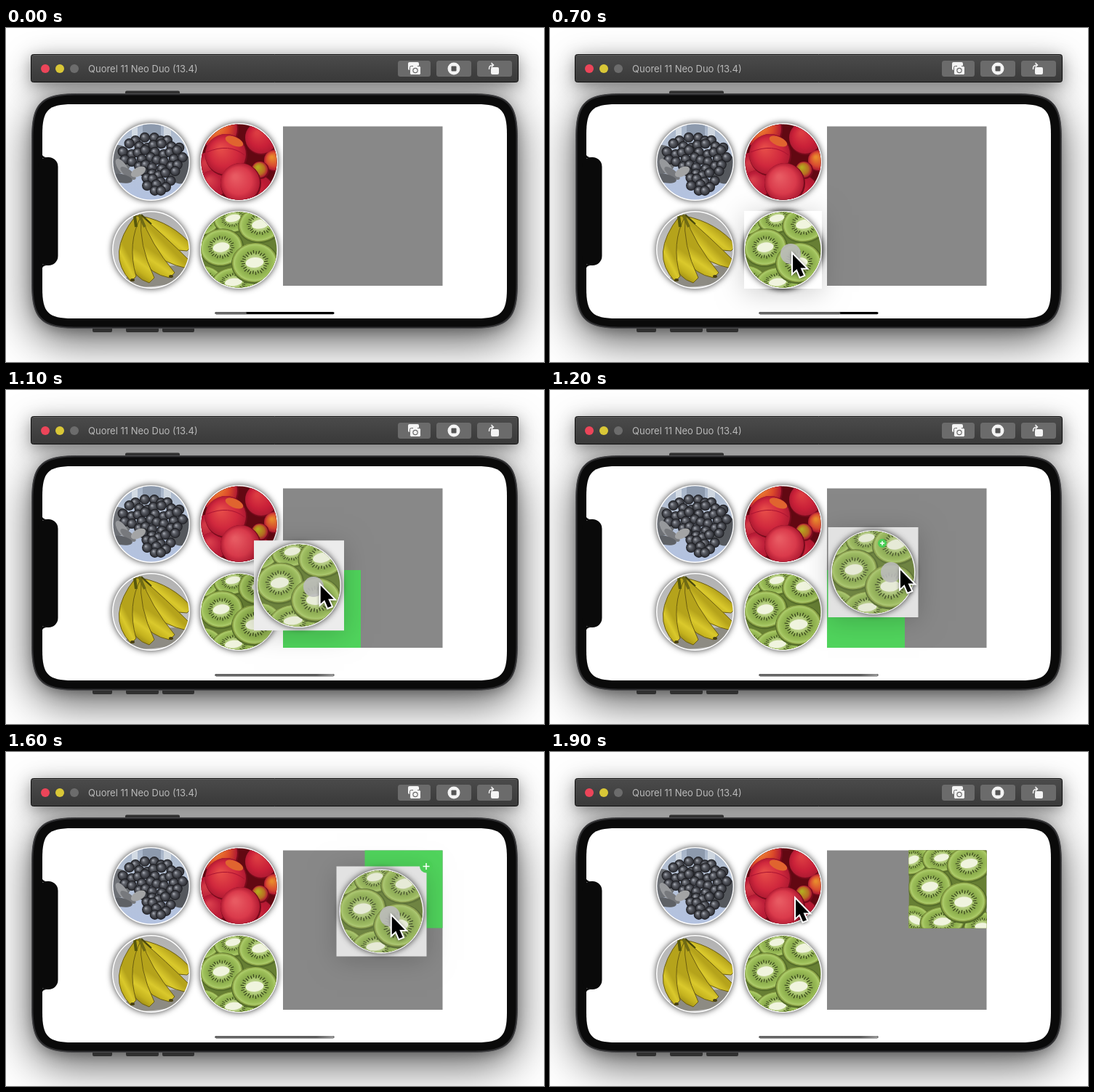
These frames come from a looping animation (740x460 px, 2000 ms). An HTML page with a canvas:

```html
<!DOCTYPE html>
<html lang="en">
<head>
<meta charset="utf-8">
<title>Drag and drop demo</title>
<style>
html, body { margin: 0; width: 100%; height: 100%; overflow: hidden; background: #fff; }
canvas { display: block; }
</style>
</head>
<body>
<canvas id="stage" width="740" height="460"></canvas>
<script>
const ctx = document.getElementById('stage').getContext('2d');
const TAU = Math.PI * 2;
const LOOP = 2000, STEP = 100, PHOTO = 107;
const BOARD = { x: 381, y: 135.5, size: 219.5 };

// Keyframes: time followed by values, linear in between.
const CURSOR = [[100, 372, 409], [400, 337, 317], [600, 334, 312], [900, 334, 312],
  [1200, 482, 248], [1300, 527, 228], [1700, 532, 226], [1900, 338, 203]];
const TOUCH = [[600, 331, 311], [900, 331, 311], [1200, 469, 251], [1300, 520, 229], [1600, 528, 226]];
const CARD = [[700, 320.5, 305.5, 107], [900, 320, 306, 124], [1200, 444.5, 251, 124],
  [1300, 501, 225.5, 124], [1600, 516.5, 219.5, 124], [1800, 546.5, 188.5, 107]];
const BADGE = [[1200, 457, 211, 6], [1300, 552, 169, 9], [1600, 578, 157.5, 9]];
const HOME = [[400, 331], [900, 445], [1000, 451]];

function sample(keys, t) {
  if (t <= keys[0][0]) return keys[0].slice(1);
  const next = keys.findIndex(k => k[0] >= t);
  if (next < 0) return keys[keys.length - 1].slice(1);
  const a = keys[next - 1], b = keys[next], p = (t - a[0]) / (b[0] - a[0]);
  return a.slice(1).map((v, i) => v + (b[i + 1] - v) * p);
}

function paintPath(fill, stroke) {
  if (fill) { ctx.fillStyle = fill; ctx.fill(); }
  if (stroke) { ctx.strokeStyle = stroke; ctx.stroke(); }
}

function box(x, y, w, h, r, fill, stroke) {
  ctx.beginPath();
  ctx.roundRect(x, y, w, h, r);
  paintPath(fill, stroke);
}

// Rectangle whose corners bend gradually over the length e.
function smoothBox(x, y, w, h, e, fill, stroke) {
  const k = e * .2, r = x + w, b = y + h;
  ctx.beginPath();
  ctx.moveTo(x + e, y);
  ctx.lineTo(r - e, y);
  ctx.bezierCurveTo(r - k, y, r, y + k, r, y + e);
  ctx.lineTo(r, b - e);
  ctx.bezierCurveTo(r, b - k, r - k, b, r - e, b);
  ctx.lineTo(x + e, b);
  ctx.bezierCurveTo(x + k, b, x, b - k, x, b - e);
  ctx.lineTo(x, y + e);
  ctx.bezierCurveTo(x, y + k, x + k, y, x + e, y);
  ctx.closePath();
  paintPath(fill, stroke);
}

function oval(x, y, rx, ry, fill, angle = 0) {
  ctx.beginPath();
  ctx.ellipse(x, y, rx, ry, angle, 0, TAU);
  paintPath(fill);
}
const disc = (x, y, r, fill) => oval(x, y, r, r, fill);

function line(points, color, width) {
  ctx.beginPath();
  points.forEach(([x, y]) => ctx.lineTo(x, y));
  ctx.lineWidth = width;
  paintPath(null, color);
  ctx.lineWidth = 1;
}

function shade(gradient, ...stops) {
  stops.forEach(([at, color]) => gradient.addColorStop(at, color));
  return gradient;
}

function shadowed(color, blur, dy, draw) {
  ctx.save();
  ctx.shadowColor = color;
  ctx.shadowBlur = blur;
  ctx.shadowOffsetY = dy;
  draw();
  ctx.restore();
}

// Fruit pictures, each painted in a square of PHOTO pixels.
function grapes() {
  box(0, 0, PHOTO, PHOTO, 0, shade(ctx.createLinearGradient(0, 0, 0, PHOTO),
    [0, '#a4b2c6'], [.3, '#b7c3d6'], [1, '#b3c2e0']));
  box(27, 0, 8, 30, 3, '#d3dbe4');
  box(71, 0, 10, 30, 3, '#ced6df');
  box(42, 0, 25, 22, 4, '#8d9aad');
  oval(8, 50, 19, 20, '#6d7075', -.3);
  oval(96, 64, 18, 20, '#55585d', .6);
  // Row: height, left end, right end.
  const rows = [[22, 34, 78], [31, 25, 94], [40, 14, 100], [50, 18, 103], [60, 35, 100],
    [69, 42, 92], [78, 46, 86], [87, 50, 80], [95, 57, 76]];
  for (const [y, left, right] of rows) {
    for (let x = left; x <= right; x += 11) {
      const gx = x + Math.sin(x * 3 + y) * 2, gy = y + Math.sin(x * 7 + y) * 3;
      disc(gx, gy, 7, '#1d1e22');
      disc(gx, gy, 6.2, shade(ctx.createRadialGradient(gx - 2, gy - 2, .5, gx, gy, 6.2),
        [0, '#a0a3ab'], [.35, '#5d6068'], [1, '#2c2d33']));
    }
  }
  oval(14, 61, 6, 14, '#97999c', -.6);
  oval(22, 69, 5, 13, '#77797d', -.9);
  oval(36, 67, 11, 6, '#a3a4a5', -.5);
  oval(12, 76, 16, 6, '#5e6166', .2);
}

function peach(x, y, r, light, dark) {
  disc(x + 1, y + 1, r + 1, '#780b1c');
  disc(x, y, r, shade(ctx.createRadialGradient(x - r * .25, y - r * .3, r * .1, x, y, r),
    [0, light], [.65, dark], [1, '#b01a32']));
}

function peaches() {
  box(0, 0, PHOTO, PHOTO, 0, '#620812');
  peach(24, 8, 27, '#f59a35', '#dc4a2a');
  peach(84, 20, 22, '#dc3c42', '#c92038');
  peach(102, 51, 14, '#e88a2d', '#d84a30');
  peach(75, 98, 28, '#d63745', '#bd1a34');
  peach(12, 61, 21, '#d03945', '#b51b35');
  peach(17, 84, 19, '#d83e4c', '#bd1e39');
  peach(82, 64, 11, '#b4aa20', '#b96e22');
  peach(35, 43, 28, '#e54a48', '#d0283d');
  oval(47, 25, 13, 6, '#e0642f', .4);
  ctx.beginPath();
  ctx.moveTo(9, 40);
  ctx.quadraticCurveTo(40, 27, 61, 44);
  paintPath(null, '#a91331');
  peach(55, 82, 27, '#e85a62', '#da3a4b');
}

// A crescent from the common stem to a tip, with one control point per side.
function banana(tipX, tipY, outX, outY, inX, inY) {
  const stemX = 36, stemY = 7;
  ctx.beginPath();
  ctx.moveTo(stemX - 4, stemY);
  ctx.quadraticCurveTo(outX, outY, tipX - 3, tipY + 3);
  ctx.lineTo(tipX + 4, tipY - 4);
  ctx.quadraticCurveTo(inX, inY, stemX + 4, stemY);
  ctx.closePath();
  paintPath(shade(ctx.createLinearGradient(outX, outY, inX, inY),
    [.15, '#8f7e12'], [.4, '#c4b21e'], [.6, '#dac92c'], [.85, '#b5a31b']), '#6b5d10');
}

function bananas() {
  box(0, 0, PHOTO, PHOTO, 0, shade(ctx.createLinearGradient(80, 0, 60, PHOTO),
    [0, '#b0b0b0'], [.5, '#bdbdbd'], [1, '#c9c9c9']));
  oval(64, 90, 48, 13, '#8d8b83', -.15);
  banana(106, 52, 54, 54, 84, 16);
  banana(106, 76, 40, 66, 72, 34);
  banana(82, 89, 26, 82, 52, 44);
  banana(54, 96, 8, 86, 36, 46);
  banana(29, 94, -10, 60, 20, 44);
  line([[31, 7], [33, 22]], '#56570c', 4);
  line([[37, 5], [45, 22]], '#6f6a15', 4);
  line([[40, 5], [54, 18]], '#46470c', 2);
  oval(28, 95, 3, 2, '#494013');
  oval(81, 90, 3, 2, '#494013');
}

function slice(x, y, rx, ry, angle = 0) {
  ctx.save();
  ctx.translate(x, y);
  ctx.rotate(angle);
  ctx.scale(rx, ry);
  disc(.02, .04, 1.06, '#566d2a');
  disc(0, 0, 1, '#8ea548');
  disc(0, 0, .94, shade(ctx.createRadialGradient(0, 0, .1, 0, 0, .94),
    [0, '#dfe8bb'], [.35, '#abc772'], [.6, '#8aab4c'], [.85, '#9cbe58'], [1, '#b0cf70']));
  for (let i = 0; i < 28; i++) {
    const a = i / 28 * TAU, inner = .42 + .05 * (i % 2), outer = inner + .16;
    line([[Math.cos(a) * inner, Math.sin(a) * inner],
      [Math.cos(a) * outer, Math.sin(a) * outer]], '#3c4a1c', .045);
  }
  oval(0, 0, .4, .26, '#f0f4de');
  ctx.restore();
}

function kiwis() {
  box(0, 0, PHOTO, PHOTO, 0, '#677f34');
  slice(5, 13, 24, 19, -.4);
  slice(45, 10, 26, 19, -.2);
  slice(9, 96, 25, 19, .5);
  slice(101, 105, 25, 20);
  slice(46, 98, 30, 20, -.1);
  slice(83, 18, 30, 24, -.2);
  slice(29, 50, 29, 25, -.15);
  slice(75, 71, 31, 27, -.1);
}

function photo(paint, x, y, size) {
  ctx.save();
  ctx.translate(x, y);
  ctx.scale(size / PHOTO, size / PHOTO);
  ctx.beginPath();
  ctx.rect(0, 0, PHOTO, PHOTO);
  ctx.clip();
  paint();
  ctx.restore();
}

function roundPhoto(paint, x, y, r) {
  shadowed('rgba(0,0,0,.75)', 9, 0, () => disc(x, y, r, '#fff'));
  ctx.save();
  ctx.beginPath();
  ctx.arc(x, y, r - 1.5, 0, TAU);
  ctx.clip();
  photo(paint, x - r, y - r, r * 2);
  ctx.restore();
}

function titleBar() {
  box(34.5, 36.5, 670, 38, 3, shade(ctx.createLinearGradient(0, 36, 0, 75),
    [0, '#4b4b4b'], [1, '#393939']), '#111');
  line([[38, 37.5], [701, 37.5]], '#656565', 1);
  ['#ec4559', '#d9c737', '#6c6c6c'].forEach((color, i) => disc(54 + i * 20, 56, 6, color));
  ctx.font = '13px Inter, sans-serif';
  ctx.fillStyle = '#b9b9b9';
  ctx.fillText('Quorel 11 Neo Duo (13.4)', 113, 61);
  [[539, 45], [592, 48], [648, 48]].forEach(([x, w]) => box(x, 45, w, 22, 3.5, '#6b6b6b'));

  box(553, 47, 15, 11, 2, '#f4f4f4');
  box(555.5, 52.5, 15, 12, 2, '#f4f4f4', '#6b6b6b');
  box(560, 51, 6, 3, 1, '#f4f4f4');
  disc(563, 58.5, 3.7, '#6b6b6b');
  disc(563, 58.5, 2.5, '#f4f4f4');

  disc(616, 56, 8.5, '#f4f4f4');
  box(612.5, 52.5, 7, 7, 1, '#555');

  box(667, 54, 11, 10, 2, '#f4f4f4');
  ctx.beginPath();
  ctx.moveTo(664.5, 57);
  ctx.quadraticCurveTo(664, 51, 670, 51);
  ctx.lineWidth = 1.5;
  paintPath(null, '#f4f4f4');
  line([[667.5, 48], [670.5, 51], [667.5, 54]], '#f4f4f4', 1.5);
}

function windowShadows() {
  const bar = () => box(35, 37, 669, 37, 3, '#333');
  const body = () => smoothBox(36, 91, 667, 322, 62, '#222');
  shadowed('rgba(0,0,0,.4)', 42, 10, bar);
  shadowed('rgba(0,0,0,.65)', 60, 17, body);
  shadowed('rgba(0,0,0,.3)', 18, 4, bar);
  shadowed('rgba(0,0,0,.3)', 18, 3, body);
}

function phone() {
  box(164, 86.5, 75, 8, 2, '#303030');
  [[119, 27], [165, 45], [215, 44]].forEach(([x, w]) => box(x, 410, w, 9, 2, '#303030'));
  smoothBox(35.5, 90.5, 668, 323, 62, '#2b2b2d', '#4a4a4c');
  smoothBox(37.5, 92.5, 664, 319, 60, '#0a0a0a');
  smoothBox(50, 105, 639, 295, 41, '#fff');
  box(44, 178, 27.5, 149, 13, '#0a0a0a');
  // Small fillets where the notch meets the bezel.
  for (const [y, dir] of [[178, -1], [327, 1]]) {
    ctx.beginPath();
    ctx.moveTo(49, y + dir * 6);
    ctx.quadraticCurveTo(50, y, 56, y);
    ctx.lineTo(49, y - dir * 2);
    paintPath('#0a0a0a');
  }
}

function homeIndicator(t) {
  const [edge] = sample(HOME, t);
  box(287.5, 391, 164, 3.2, 1.6, '#000');
  box(287.5, 391, edge - 287.5, 3.2, 1.6, shade(ctx.createLinearGradient(288, 0, 451, 0),
    [0, '#666'], [.85, '#5c5c5c'], [1, '#999']));
}

function activeCell(x, y) {
  const { x: left, y: top, size } = BOARD;
  if (x < left || x > left + size || y < top || y > top + size) return null;
  return [x < left + size / 2 ? left : left + 112.5, y < top + size / 2 ? top : top + 112.5];
}

function dragCard(t) {
  const [x, y, size] = sample(CARD, t);
  const overBoard = Math.min(1, Math.max(0, (t - 900) / 300));
  const tone = 255 - 29 * overBoard;
  shadowed('rgba(0,0,0,.2)', 34, 5, () =>
    box(x - size / 2, y - size / 2, size, size, 0, `rgb(${tone},${tone},${tone})`));
  const r = 53.5 + (size - PHOTO) / 17 * 4.5;
  roundPhoto(kiwis, x, y, r);
  disc(x, y, r, `rgba(165,165,165,${.13 * overBoard})`);
}

function badge(t) {
  const [x, y, r] = sample(BADGE, t), arm = r * .5;
  disc(x, y, r, '#4bce56');
  line([[x - arm, y], [x + arm, y]], '#fff', 1.5);
  line([[x, y - arm], [x, y + arm]], '#fff', 1.5);
}

function cursor(t) {
  const [x, y] = sample(CURSOR, t);
  ctx.save();
  ctx.translate(x, y);
  shadowed('rgba(0,0,0,.4)', 4, 1, () => {
    ctx.beginPath();
    [[0, 0], [0, 25], [5.5, 20], [10, 30.5], [15, 28.5], [10.5, 18.5], [18, 18.5]]
      .forEach(([px, py]) => ctx.lineTo(px, py));
    ctx.closePath();
    ctx.lineWidth = 4;
    paintPath(null, '#fff');
  });
  paintPath('#000');
  ctx.restore();
}

function draw(t) {
  ctx.fillStyle = '#fff';
  ctx.fillRect(0, 0, 740, 460);
  windowShadows();
  phone();
  titleBar();
  homeIndicator(t);

  const pressed = t >= 600 && t <= 1600;
  const [touchX, touchY] = sample(TOUCH, t);
  const cell = pressed && activeCell(touchX, touchY);

  box(BOARD.x, BOARD.y, BOARD.size, BOARD.size, 0, '#888');
  if (cell) box(...cell, PHOTO, PHOTO, 0, '#50d45c');
  if (t >= 1800) photo(kiwis, 493.5, 135.5, PHOTO);

  [grapes, peaches, bananas, kiwis].forEach((paint, i) =>
    roundPhoto(paint, 199.5 + i % 2 * 121, 184.5 + (i >> 1) * 121, 53.5));

  if (t >= 700 && t < 1800) dragCard(t);
  if (t >= 1200 && t <= 1600) badge(t);
  if (pressed) disc(touchX, touchY, 14, 'rgba(187,187,187,.9)');
  if (t >= 100) cursor(t);
}

let shown = -1;
function tick() {
  const t = Math.floor(performance.now() % LOOP / STEP) * STEP;
  if (t !== shown) draw(shown = t);
  requestAnimationFrame(tick);
}
tick();
</script>
</body>
</html>
```
